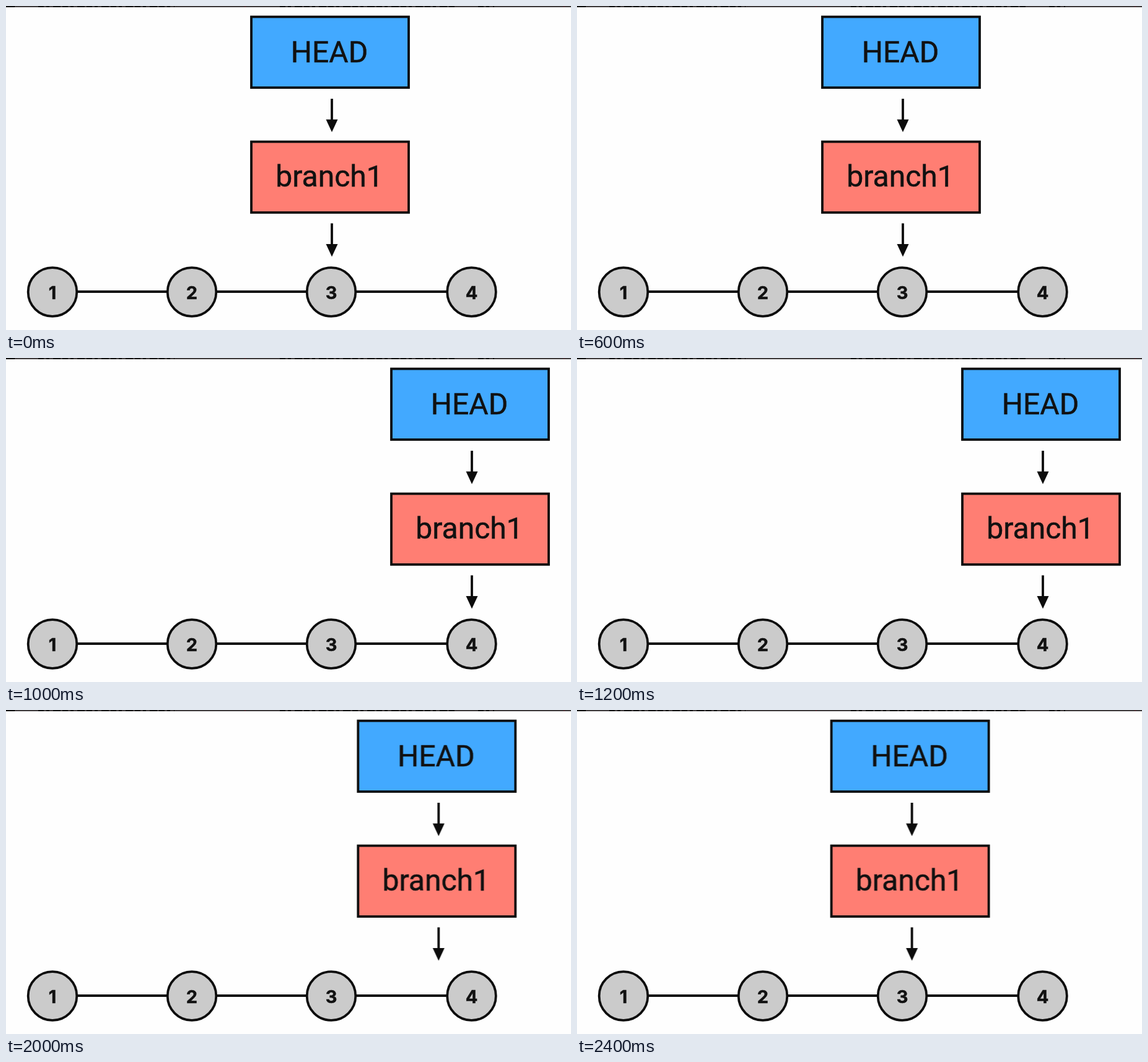
Write an HTML page that moves like this. It is 912x524 px and loops after 2.6 s.

```html
<!DOCTYPE html>
<html lang="en">
<head>
<meta charset="utf-8">
<title>Branch pointer</title>
<style>
  html, body { margin: 0; width: 100%; height: 100%; overflow: hidden; background: #fefefe; }
  svg { display: block; width: 912px; height: 524px; }
  text { text-anchor: middle; fill: #111; stroke: #111; stroke-width: 0.5; }
  .label { font: 48px Roboto, sans-serif; }
  .number { font: 700 29px Inter, sans-serif; }
  .box, .commit, .line { stroke: #0c0c0c; stroke-width: 3.8; }
  .commit { fill: #cbcbcb; }
  #graph, #pointer { filter: blur(0.5px); }
</style>
</head>
<body>
<svg viewBox="0 0 912 524">
  <defs>
    <g id="arrow">
      <path class="line" d="M526 0V36"/>
      <path d="M516.5 33.5H535.5L526 54Z" fill="#0c0c0c"/>
    </g>
  </defs>

  <!-- Dark strip with clipped lettering along the top edge -->
  <rect width="912" height="2" fill="#3d393a"/>
  <rect width="14" height="2"/>
  <path d="M52 1H272M442 1H728M762 1H788" stroke="#111" stroke-width="2" stroke-dasharray="9 4 5 6 12 3"/>
  <path d="M386 0V2M901 0V2" stroke="#6b2530"/>

  <g id="graph"><path class="line" d="M75 462H751"/></g>

  <g id="pointer">
    <rect class="box" x="396" y="17.5" width="254" height="114.5" fill="#42a9ff"/>
    <text class="label" x="522" y="90.5">HEAD</text>
    <use href="#arrow" y="150"/>
    <rect class="box" x="396" y="219.5" width="254" height="114.5" fill="#ff7e73"/>
    <text class="label" x="522" y="292">branch1</text>
    <use href="#arrow" y="351.5"/>
  </g>
</svg>
<script>
  const LOOP = 2600, STEP = 200;
  const JUMP = 800, RETURN = 1800;
  const SHIFT = 226;
  const EASE_START = 1418, EASE_LENGTH = 1402;

  const graph = document.getElementById('graph');
  const pointer = document.getElementById('pointer');

  [75, 300, 525, 751.5].forEach((x, i) => {
    graph.insertAdjacentHTML('beforeend',
      `<circle class="commit" cx="${x}" cy="462.5" r="39.3"/>
       <text class="number" x="${x}" y="473.5">${i + 1}</text>`);
  });

  const easeInOutQuart = u => u < 0.5 ? 8 * u ** 4 : 1 - 8 * (1 - u) ** 4;

  function offsetAt(time) {
    if (time < JUMP) return 0;
    if (time < RETURN) return SHIFT;
    return SHIFT * (1 - easeInOutQuart((time - EASE_START) / EASE_LENGTH));
  }

  function draw() {
    const time = performance.now() % LOOP;
    const held = Math.floor(time / STEP) * STEP;
    pointer.setAttribute('transform', `translate(${offsetAt(held).toFixed(1)} 0)`);
    requestAnimationFrame(draw);
  }
  draw();
</script>
</body>
</html>
```
